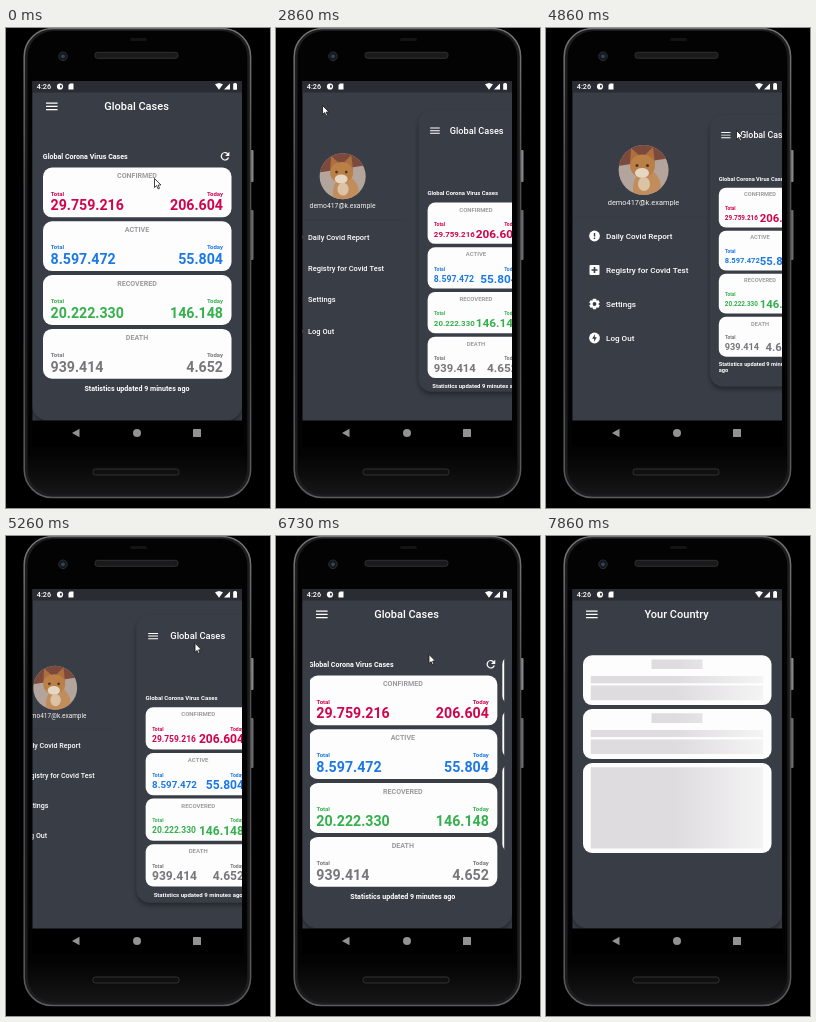
Animation, 264 px wide and 480 px high, one loop 8000 ms. Source, as an HTML page with a canvas:

```html
<!DOCTYPE html>
<html lang="en">
<head>
<meta charset="utf-8">
<title>Case tracker</title>
<style>
  html, body { margin: 0; width: 100%; height: 100%; overflow: hidden; background: #000; }
  canvas { display: block; width: 264px; height: 480px; }
</style>
</head>
<body>
<canvas id="stage" width="264" height="480"></canvas>
<script>
const ctx = document.getElementById('stage').getContext('2d');
const LOOP = 8000;
const MID_Y = 222;          // vertical centre of the app area
const PAGE_PITCH = 193.5;   // distance between swiped pages
const SURFACE = '#393e46';

const CARDS = [
  ['CONFIRMED', '29.759.216', '206.604', '#d0034c'],
  ['ACTIVE', '8.597.472', '55.804', '#1b78e4'],
  ['RECOVERED', '20.222.330', '146.148', '#34b04c'],
  ['DEATH', '939.414', '4.652', '#77777a'],
];
const MENU = ['Daily Covid Report', 'Registry for Covid Test', 'Settings', 'Log Out'];

// Pointer path: time, x, y
const POINTER = [
  [0, 148, 150], [60, 148, 150], [330, 141, 142], [860, 141, 142], [1660, 58, 82],
  [2000, 45, 73], [2660, 45, 73], [2760, 46, 77], [2950, 46, 77], [3500, 70, 190],
  [3800, 92, 267], [4150, 190, 120], [4330, 194, 89], [4600, 184, 101], [4800, 184, 101],
  [4860, 190, 102], [5200, 190, 102], [5530, 182, 128], [6000, 206, 139],
  [6260, 195, 119], [6400, 195, 118], [6600, 195, 118], [6730, 153, 118], [7000, 17, 122],
];

const clamp = v => Math.max(0, Math.min(1, v));
const mix = (a, b, u) => a + (b - a) * u;

function text(str, x, y, size, color, weight = 700, align = 'left') {
  ctx.font = `${weight} ${size}px Roboto, sans-serif`;
  ctx.textAlign = align;
  ctx.fillStyle = color;
  ctx.fillText(str, x, y + size * 0.355);
}

function textWidth(str, size, weight = 700) {
  ctx.font = `${weight} ${size}px Roboto, sans-serif`;
  return ctx.measureText(str).width;
}

function box(x, y, w, h, r, fill, stroke, lineWidth = 1) {
  ctx.beginPath();
  ctx.roundRect(x, y, w, h, r);
  paint(fill, stroke, lineWidth);
}

function disc(x, y, r, fill, stroke, lineWidth = 1) {
  ctx.beginPath();
  ctx.arc(x, y, r, 0, Math.PI * 2);
  paint(fill, stroke, lineWidth);
}

function oval(x, y, rx, ry, fill) {
  ctx.beginPath();
  ctx.ellipse(x, y, rx, ry, 0, 0, Math.PI * 2);
  paint(fill);
}

function poly(points, fill, stroke, lineWidth = 1) {
  ctx.beginPath();
  for (let i = 0; i < points.length; i += 2) ctx.lineTo(points[i], points[i + 1]);
  ctx.closePath();
  paint(fill, stroke, lineWidth);
}

function paint(fill, stroke, lineWidth) {
  if (fill) { ctx.fillStyle = fill; ctx.fill(); }
  if (stroke) { ctx.strokeStyle = stroke; ctx.lineWidth = lineWidth; ctx.stroke(); }
}

function group(draw) {
  ctx.save();
  draw();
  ctx.restore();
}

function clipRect(x, y, w, h) {
  ctx.beginPath();
  ctx.rect(x, y, w, h);
  ctx.clip();
}

function verticalGradient(y0, y1, ...colors) {
  const gradient = ctx.createLinearGradient(0, y0, 0, y1);
  colors.forEach((color, i) => gradient.addColorStop(i / (colors.length - 1), color));
  return gradient;
}

function drawPhone() {
  ctx.fillStyle = '#000';
  ctx.fillRect(0, 0, 264, 480);
  box(244, 122, 3.5, 32, 1, '#87878a');
  box(244, 182, 3.5, 50, 1, '#6c6c6f');
  const rim = verticalGradient(0, 470, '#77777a', '#4e4e51', '#4e4e51', '#5c5c5f');
  box(18.2, 0.6, 226.4, 469, 28, '#1c1c1e', rim, 1.5);
  box(21.5, 3, 219.8, 463.5, 26, verticalGradient(425, 467, '#030303', '#161618'));
  box(124, 10, 17, 3, 1.5, '#141415');
  box(89, 24.3, 83, 6, 2.5, '#1a1a1b', '#303032');
  box(87, 441, 86, 6, 2.5, '#101011', '#323234');
  disc(57, 28.3, 4.3, '#14171c', '#2a2d33');
  disc(57, 28.3, 1.9, '#34435a');
}

function drawNavigation() {
  ctx.fillStyle = '#000';
  ctx.fillRect(26, 392.5, 211, 26);
  poly([66, 405, 73.5, 400.8, 73.5, 409.2], '#929292');
  disc(131, 405, 4, '#929292');
  box(187, 401, 8, 8, 0.5, '#929292');
}

function drawStatusBar() {
  ctx.fillStyle = '#292d33';
  ctx.fillRect(26, 53, 211, 11.5);
  text('4:26', 30.8, 58.7, 7.2, '#fff', 500);
  disc(54, 58.5, 3.1, '#fff');
  box(54, 57.2, 1.8, 2.4, 0, '#292d33');
  poly([62.5, 57, 64, 55.5, 67.5, 55.5, 67.5, 61.5, 62.5, 61.5], '#fff');
  poly([209, 56.3, 213, 55, 217, 56.3, 213, 61.8], '#fff');
  poly([218, 61.6, 224, 61.6, 224, 55.5], '#fff');
  box(227.2, 55.6, 3.8, 6.2, 0.5, '#fff');
  box(228.2, 54.9, 1.8, 1, 0, '#fff');
}

function drawAvatar() {
  group(() => {
    disc(97.6, 142, 25, '#b3a59c');
    ctx.clip();
    poly([72, 116, 124, 116, 124, 130, 72, 138], '#7c4a3c');
    oval(101, 160, 14, 18, '#c18d5c');
    poly([84, 136, 85, 120, 95, 129], '#ad6f3e');
    poly([97, 129, 107, 119, 109, 136], '#ad6f3e');
    oval(96.5, 138, 12.5, 11.5, '#bb8048');
    oval(96, 145, 7, 5, '#e6d6c4');
    oval(98, 156, 6, 7, '#dcc3a6');
    disc(91, 137.5, 1.5, '#4a3521');
    disc(101.5, 137.5, 1.5, '#4a3521');
  });
}

function drawMenuIcon(index, x, y) {
  if (index === 0) {
    disc(x, y, 5.4, '#fff');
    box(x - 0.7, y - 3, 1.4, 3.6, 0, SURFACE);
    box(x - 0.7, y + 1.5, 1.4, 1.4, 0, SURFACE);
  } else if (index === 1) {
    box(x - 5, y - 5, 10, 10, 1, '#fff');
    box(x - 3, y - 0.8, 6, 1.6, 0, SURFACE);
    box(x - 0.8, y - 3, 1.6, 6, 0, SURFACE);
  } else if (index === 2) {
    for (let i = 0; i < 3; i++) group(() => {
      ctx.translate(x, y);
      ctx.rotate(i * Math.PI / 3);
      box(-1.7, -5.3, 3.4, 10.6, 0.6, '#fff');
    });
    disc(x, y, 4, '#fff');
    disc(x, y, 1.9, SURFACE);
  } else {
    disc(x, y, 5.4, '#fff');
    poly([x + 0.6, y - 4, x - 2.4, y + 0.7, x - 0.3, y + 0.7, x - 0.6, y + 4,
          x + 2.4, y - 0.8, x + 0.3, y - 0.8], SURFACE);
  }
}

function drawMenu(open) {
  group(() => {
    const scale = 0.5 + 0.5 * open;
    ctx.translate(131 - 215 * (1 - open), MID_Y);
    ctx.scale(scale, scale);
    ctx.translate(-131, -MID_Y);
    drawAvatar();
    text('demo417@k.example', 97.5, 174, 7.4, '#f2f2f2', 400, 'center');
    ctx.fillStyle = 'rgba(0,0,0,.07)';
    ctx.fillRect(26, 188.5, 140, 0.8);
    MENU.forEach((label, i) => {
      const y = 208 + 34 * i;
      drawMenuIcon(i, 48.5, y);
      text(label, 60, y, 8.1, '#fff', 500);
    });
  });
}

function drawRefresh(x, y) {
  ctx.beginPath();
  ctx.arc(x, y, 3.7, 0.35, Math.PI * 1.76);
  paint(null, '#fff', 1.2);
  poly([x + 4.4, y - 4.6, x + 4.4, y - 0.4, x + 0.2, y - 0.4], '#fff');
}

// The total shrinks in half steps to fit its column; today's figure keeps its size.
function drawFigures(total, today, y, width, color) {
  const size = 14.2, left = 18.5, right = width - 19;
  const column = (right - left) / 2;
  const fit = column / textWidth(total, size);
  text(total, left, y, fit < 1 ? Math.floor(size * fit * 2) / 2 : size, color);
  text(today, Math.max(left + column, right - textWidth(today, size)), y, size, color);
}

function drawStatistics(width, open) {
  text('Global Corona Virus Cases', 10.8, 128.3, 7.1, '#fff');
  drawRefresh(width - 17, 128.3);
  CARDS.forEach(([name, total, today, color], i) => {
    const y = 139.5 + 53.8 * i;
    box(11, y, width - 21.5, 49.8, 9, '#fdfdfe');
    text(name, width / 2, y + 8.4, 7.1, '#9b9b9d', 700, 'center');
    text('Total', 18.7, y + 26, 6, color);
    text('Today', width - 19, y + 26, 6, color, 700, 'right');
    drawFigures(total, today, y + 37.6, width, color);
  });
  if (open > 0.97) {
    text('Statistics updated 9 minutes', 10.8, 360, 7.1, '#fff');
    text('ago', 10.8, 368, 7.1, '#fff');
  } else {
    text('Statistics updated 9 minutes ago', width / 2, 360, 7.1, '#fff', 700, 'center');
  }
}

function drawPlaceholder(shimmer) {
  let tone = '#dedcde';
  if (shimmer) {
    tone = ctx.createLinearGradient(104, 0, 191, 0);
    tone.addColorStop(0, '#dedcde');
    tone.addColorStop(1, '#f5f4f5');
  }
  const bar = (x, y, w, h) => box(x, y, w, h, 0, tone);
  for (const y of [119.3, 173.1]) {
    box(11, y, 188.5, 49.8, 9, '#fdfdfe');
    bar(79.5, y + 4.2, 51, 9.6);
    bar(18.8, y + 20.8, 172.4, 7.2);
    bar(18.8, y + 30.3, 172.4, 14.7);
  }
  box(11, 227, 188.5, 90, 9, '#fdfdfe');
  bar(18.8, 231.3, 172.4, 81.2);
}

function drawPage(open, swipe, shimmer) {
  const width = 210 - 85 * open;
  const scale = 1 - 0.2 * open;
  group(() => {
    ctx.translate(26 + 138 * open, MID_Y);
    ctx.scale(scale, scale);
    ctx.translate(0, -MID_Y);
    group(() => {
      ctx.shadowColor = 'rgba(0,0,0,.38)';
      ctx.shadowBlur = 5;
      ctx.shadowOffsetY = 3;
      box(0, 53, width, 339.5, 16, SURFACE);
    });
    for (const y of [75.2, 78.4, 81.6]) box(14, y - 0.6, 11.6, 1.2, 0, '#fff');
    const title = swipe > 0.5 ? 'Your Country' : 'Global Cases';
    text(title, Math.max(70, width / 2 - 0.5), 78, 11, '#fff', 500, 'center');

    clipRect(8, 90, width - 15.8, 300);
    // The narrowing page pushes its content down until the layout settles.
    ctx.translate(-PAGE_PITCH * swipe, open < 1 ? 30 * open : 4.6);
    if (swipe < 1) drawStatistics(width, open);
    if (swipe > 0) {
      ctx.translate(PAGE_PITCH, 0);
      drawPlaceholder(shimmer);
    }
  });
}

function drawPointer(t) {
  if (t > 7040) return;
  let i = POINTER.findIndex(key => key[0] > t);
  if (i < 0) i = POINTER.length - 1;
  const [t0, x0, y0] = POINTER[i - 1], [t1, x1, y1] = POINTER[i];
  const u = clamp((t - t0) / (t1 - t0));
  group(() => {
    ctx.translate(mix(x0, x1, u) + 0.5, mix(y0, y1, u) + 0.5);
    poly([0, 0, 0, 9, 2.1, 7.1, 3.6, 10.4, 5, 9.8, 3.6, 6.6, 6.4, 6.4], '#fff', '#151515', 0.8);
  });
}

function draw(t) {
  const open = clamp((t - 2650) / 250) - clamp((t - 5200) / 250);
  const u = clamp((t - 6606) / 900);
  const swipe = u * u * u * (10 - 15 * u + 6 * u * u);
  drawPhone();
  group(() => {
    clipRect(26.5, 53, 209.5, 340);
    ctx.fillStyle = SURFACE;
    ctx.fillRect(26, 53, 211, 340);
    drawMenu(open);
    // With the page's corner shadow falling on the menu surface beneath.
    drawPage(open, swipe, t >= 7860);
    drawStatusBar();
  });
  drawNavigation();
  drawPointer(t);
}

const start = performance.now();
function tick() {
  draw((performance.now() - start) % LOOP);
  requestAnimationFrame(tick);
}
tick();
</script>
</body>
</html>
```
